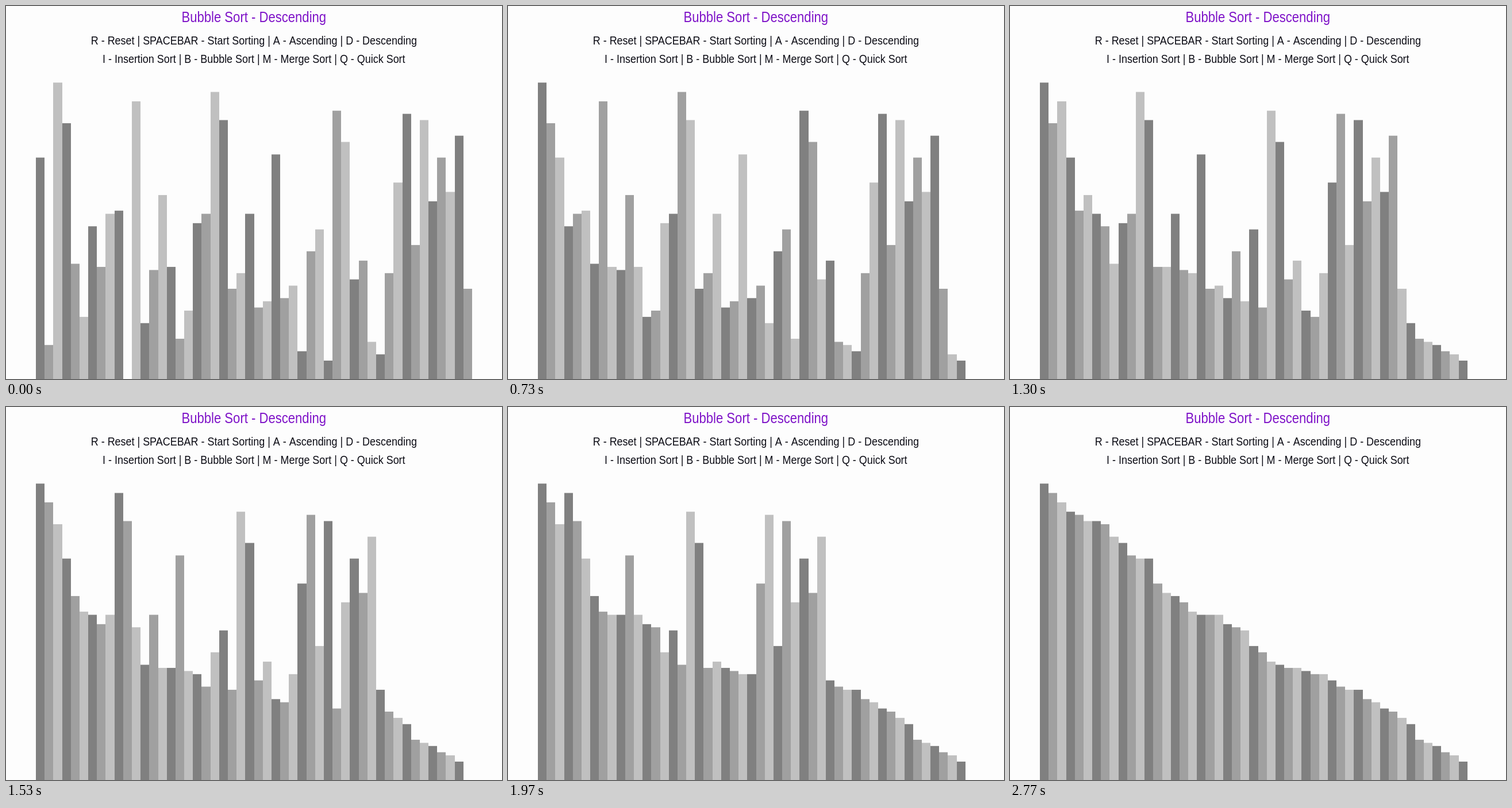
Animation, 863 px wide and 649 px high, one loop 2.83 s. Source, as an HTML page with a canvas:

```html
<!DOCTYPE html>
<html lang="en">
<head>
<meta charset="utf-8">
<title>Bubble Sort</title>
<style>
  html, body { margin: 0; width: 100%; height: 100%; overflow: hidden; background: #fdfdfd; }
  canvas { display: block; }
</style>
</head>
<body>
<canvas id="stage" width="863" height="649"></canvas>
<script>
const ctx = document.getElementById('stage').getContext('2d');
const LOOP = 2830, LEFT = 52, BAR = 15.18, FLOOR = 649.6, UNIT = 5.435;
const GREYS = ['#808080', '#a0a0a0', '#c0c0c0'];

// The unsorted input; every later state follows from the sort itself
const input = [
  71, 11, 95, 82, 37, 20, 49, 36, 53, 54, 0, 89, 18, 35, 59, 36, 13,
  22, 50, 53, 92, 83, 29, 34, 53, 23, 25, 72, 26, 30, 9, 41, 48, 6,
  86, 76, 32, 38, 12, 8, 34, 63, 85, 43, 83, 57, 71, 60, 78, 29
];

// Descending bubble sort, stopped after a number of swaps
function sortFor(swaps) {
  const a = [...input];
  for (let end = a.length - 1; end > 0; end--)
    for (let j = 0; j < end; j++)
      if (a[j] < a[j + 1]) {
        if (swaps-- <= 0) return a;
        [a[j], a[j + 1]] = [a[j + 1], a[j]];
      }
  return a;
}

function text(str, size, baseline, color) {
  ctx.save();
  ctx.translate(431.3, baseline);
  ctx.scale(.88, 1); // condensed face
  ctx.font = `${size}px "Liberation Sans", Arial, sans-serif`;
  ctx.textAlign = 'center';
  ctx.fillStyle = color;
  ctx.fillText(str, 0, 0);
  ctx.restore();
}

function draw(t) {
  // 30 ticks a second, on a 10 ms clock; about 8 swaps per tick
  const tick = Math.floor((3 * Math.floor(t / 10) + 1) / 10);
  const swaps = Math.round(8.146 * tick - 26);

  ctx.fillStyle = '#fdfdfd';
  ctx.fillRect(0, 0, 863, 649);
  text('Bubble Sort - Descending', 25.1, 28, '#7f14c8');
  text('R - Reset | SPACEBAR - Start Sorting | A - Ascending | D - Descending', 20.4, 66.5, '#0b0b14');
  text('I - Insertion Sort | B - Bubble Sort | M - Merge Sort | Q - Quick Sort', 20.4, 98.5, '#0b0b14');

  sortFor(swaps).forEach((v, i) => {
    const x = Math.round(LEFT + BAR * i);
    const right = Math.round(LEFT + BAR * (i + 1));
    ctx.fillStyle = GREYS[i % 3];
    ctx.fillRect(x, FLOOR - UNIT * v, right - x, UNIT * v);
  });
}

function loop() {
  draw(performance.now() % LOOP);
  requestAnimationFrame(loop);
}
loop();
</script>
</body>
</html>
```
